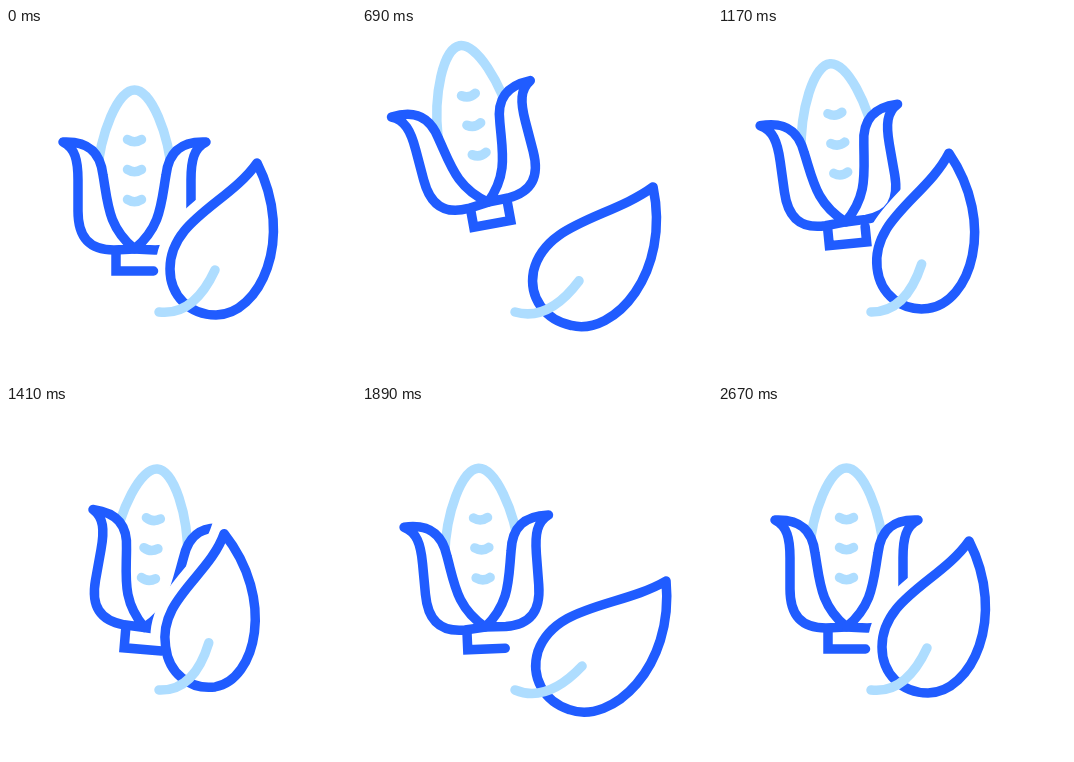
An HTML page for the animation above (2810 ms loop, 350 px wide and 350 px high).

```html
<!DOCTYPE html>
<html lang="en">
<head>
<meta charset="utf-8">
<title>Corn and leaf</title>
<style>
  html, body { margin: 0; width: 100%; height: 100%; overflow: hidden; background: #fff; }
  svg { display: block; width: 100vw; height: 100vh; }
  path { fill: none; stroke: #205cff; stroke-width: 9.5; stroke-linecap: round; stroke-linejoin: round; }
  .light { stroke: #aeddff; }
  .solid { fill: #fff; }
  #gap { fill: #fff; stroke: #fff; stroke-width: 29; stroke-linejoin: miter; stroke-miterlimit: 8; }
  #base { stroke-linejoin: miter; }
</style>
</head>
<body>
<svg viewBox="0 0 350 350">
  <defs><path id="kernel" class="light" d="M121.5 111.5Q128.5 116 135.5 111.5"/></defs>
  <g class="corn">
    <path class="light" d="M91 148C94 105 112 62 128.5 62S163 105 166 148"/>
    <use href="#kernel"/>
    <use href="#kernel" y="30"/>
    <use href="#kernel" y="60"/>
    <g id="left">
      <path id="husk" class="solid" d="M57 114C80 113 94 122 97 147C102 176 102 199 128.5 221L108 222C83 222 72 209 72 183V152C72 132 69 120 57 114Z"/>
    </g>
    <g id="right"><use href="#husk" transform="translate(257 0) scale(-1 1)"/></g>
  </g>
  <path id="gap"/>
  <g class="corn"><path id="base" d="M110 224V243H147.5V224"/></g>
  <path id="leaf" class="solid"/>
  <path id="stem" class="light"/>
</svg>
<script>
const LOOP = 2810;
const PIVOT = { x: 153, y: 284 };
const TIP = 178; // distance from the pivot to the leaf tip
const LEAF = 'M251 135C223 175 164 192 164 241C164 268 184 287 210 287C253 287 290 212 251 135Z';
const STEM = 'M153 284C178 287 196 270 209 242';

const $ = id => document.getElementById(id);
const corns = document.querySelectorAll('.corn');

// Key points: time, value
const turn = [[0, 0], [420, -9], [750, -10.4], [1080, -8.5], [1410, 4.7], [1840, -2.6], [2190, -.2], [2500, 0]];
const lift = [[0, 0], [420, .88], [750, 1.02], [1080, .77], [1410, 0]];
const lean = [[0, 0], [420, 17], [530, 17], [930, -7], [1410, -4], [1840, 15.5], [2190, 3.8], [2670, 0]];
const bend = [[0, 0], [420, 6.3], [930, 5.1], [1410, -6.7], [1840, 5.6], [2190, 6.9], [2670, 0]];

// Smooth curve through the keys that never overshoots them
function curve(keys, t) {
  const last = keys.length - 1;
  if (t <= 0) return keys[0][1];
  if (t >= keys[last][0]) return keys[last][1];
  const k = keys.findIndex(key => key[0] > t) - 1;
  const rate = j => (keys[j + 1][1] - keys[j][1]) / (keys[j + 1][0] - keys[j][0]);
  const slope = j => {
    if (j === 0 || j === last) return 0;
    const a = rate(j - 1), b = rate(j);
    return a * b <= 0 ? 0 : 2 * a * b / (a + b);
  };
  const [[t0, v0], [t1, v1]] = keys.slice(k, k + 2);
  const u = (t - t0) / (t1 - t0);
  return v0 + (v1 - v0) * u * u * (3 - 2 * u)
    + (t1 - t0) * u * (1 - u) * (slope(k) * (1 - u) - slope(k + 1) * u);
}

// Points further from the pivot turn and stretch more
function flex(path, angle, amount) {
  return path.replace(/(\d+) (\d+)/g, (_, px, py) => {
    const x = px - PIVOT.x, y = py - PIVOT.y, d = Math.hypot(x, y);
    const more = amount * d / TIP;
    const a = Math.atan2(y, x) + (angle + more) * Math.PI / 180;
    const r = d * (1 + .0075 * more);
    return (PIVOT.x + r * Math.cos(a)).toFixed(2) + ' ' + (PIVOT.y + r * Math.sin(a)).toFixed(2);
  }).replace(/(\d)C/g, '$1 C').replace(/C/g, 'C');
}

function drawLeaf(t) {
  const angle = curve(lean, t), amount = curve(bend, t);
  const outline = flex(LEAF, angle, amount);
  $('leaf').setAttribute('d', outline);
  $('gap').setAttribute('d', outline);
  $('stem').setAttribute('d', flex(STEM, angle, amount));
}

// Husks follow the cob, less so while it is in the air
const swing = t => 1.17 * curve(turn, t) + 7.5 * curve(lift, t);

function drawCorn(t) {
  const up = curve(lift, t);
  for (const g of corns) {
    g.setAttribute('transform', `translate(${19 * up} ${-48 * up}) rotate(${curve(turn, t)} 128 342)`);
  }
  $('left').setAttribute('transform', `rotate(${swing(t)} 128.5 221)`);
  $('right').setAttribute('transform', `rotate(${swing(t - 150)} 128.5 221)`);
  $('base').setAttribute('stroke-dasharray', `${56.5 + 19 * Math.min(1, up / .7)} 200`);
}

function draw(t) {
  drawCorn(t);
  drawLeaf(t);
}

let start;
function frame(now) {
  start ??= now;
  draw((now - start) % LOOP);
  requestAnimationFrame(frame);
}
draw(0);
requestAnimationFrame(frame);
</script>
</body>
</html>
```
